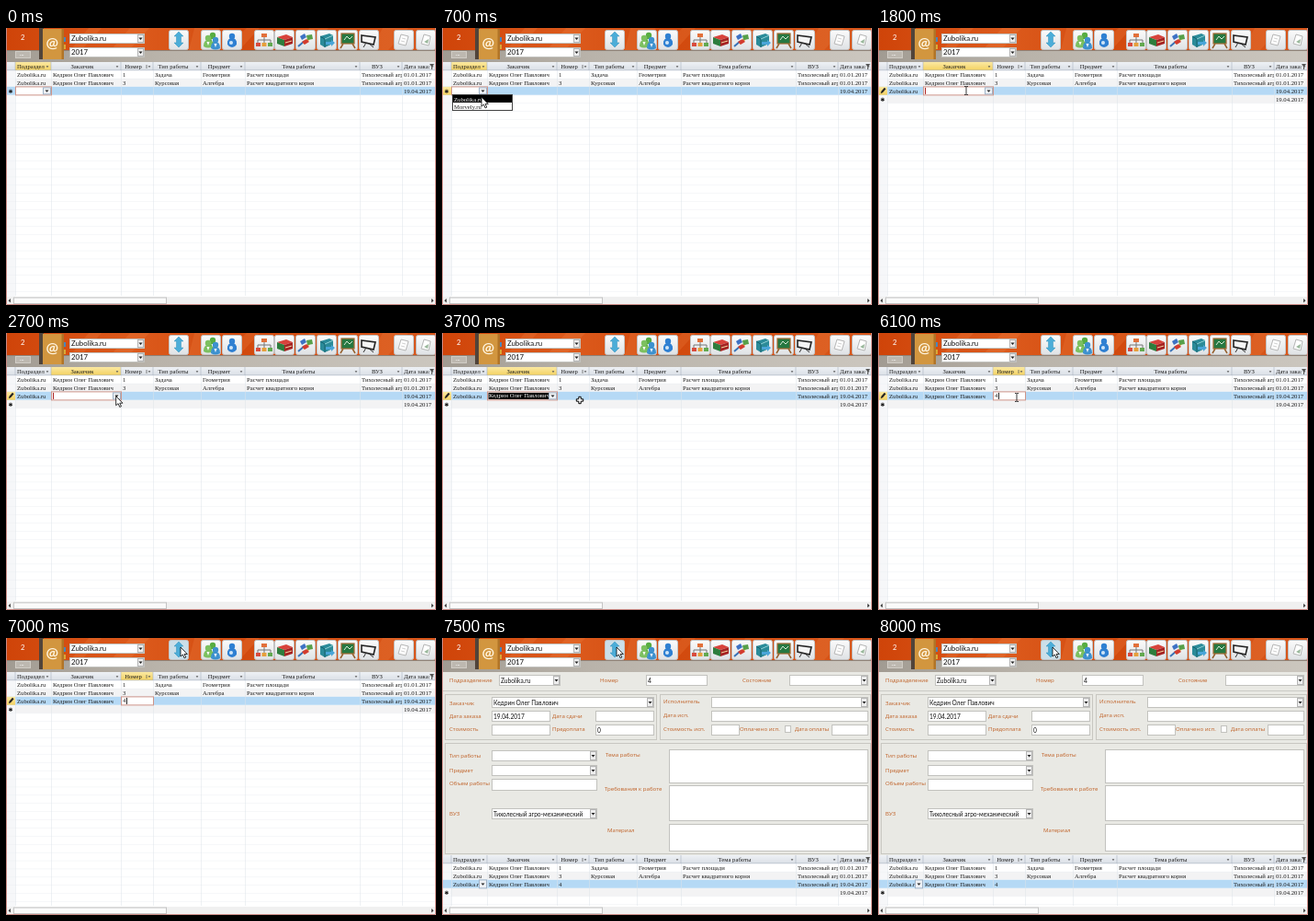
An HTML page that plays this animation: 468x301 px, repeating every 9300 ms.

```html
<!DOCTYPE html>
<html lang="ru">
<head>
<meta charset="utf-8">
<style>
  html, body { margin: 0; width: 100%; height: 100%; overflow: hidden; background: #fff; }
  svg { display: block; }
  text { white-space: pre; }
  .serif { font: 6.7px "Liberation Serif", serif; fill: #1c1c1c; }
  .sans { font: 6.6px Lato, "Open Sans", sans-serif; fill: #111; }
  .bar { font: 7.8px Lato, "Open Sans", sans-serif; fill: #111; }
  .label { font: 6.1px "Open Sans", sans-serif; fill: #bf5f24; }
</style>
</head>
<body>
<svg id="stage" width="468" height="301" viewBox="0 0 468 301">
  <defs>
    <linearGradient id="orange">
      <stop offset="0" stop-color="#cf4409"/><stop offset=".3" stop-color="#dc5a1c"/>
      <stop offset=".55" stop-color="#d24a0e"/><stop offset="1" stop-color="#d8571b"/>
    </linearGradient>
    <linearGradient id="band">
      <stop offset="0" stop-color="#a19b92"/><stop offset=".35" stop-color="#b9b3aa"/>
      <stop offset="1" stop-color="#cbc6be"/>
    </linearGradient>
    <linearGradient id="key" x2="0" y2="1">
      <stop offset="0" stop-color="#fbfbfb"/><stop offset="1" stop-color="#dfe2e5"/>
    </linearGradient>
    <linearGradient id="head" x2="0" y2="1">
      <stop offset="0" stop-color="#eef1f5"/><stop offset="1" stop-color="#dadfe6"/>
    </linearGradient>
    <linearGradient id="lit" x2="0" y2="1">
      <stop offset="0" stop-color="#fbe9a2"/><stop offset="1" stop-color="#f3d160"/>
    </linearGradient>
  </defs>
  <g id="scene"></g>
  <g id="pointer"></g>
</svg>
<script>
const LOOP = 9300;
const SITE = 'Zubolika.ru', SITE2 = 'Morvely.ru';
const CLIENT = 'Кедрин Олег Павлович', SCHOOL = 'Тихолесный агро-механический';
const scene = document.getElementById('scene');
const pointer = document.getElementById('pointer');

const rect = (x, y, w, h, fill, stroke = 'none', more = '') =>
  `<rect x="${x}" y="${y}" width="${w}" height="${h}" fill="${fill}" stroke="${stroke}" ${more}/>`;
const path = (d, fill, stroke = 'none', more = '') =>
  `<path d="${d}" fill="${fill}" stroke="${stroke}" ${more}/>`;
const circle = (x, y, r, fill) => `<circle cx="${x}" cy="${y}" r="${r}" fill="${fill}"/>`;
const text = (x, y, s, kind = 'serif', more = '') =>
  `<text x="${x}" y="${y}" class="${kind}" ${more}>${s}</text>`;
const frame = (x, y, w, h, fill, stroke) => rect(x + .5, y + .5, w - 1, h - 1, fill, stroke);
const triangle = (x, y, r = 2, fill = '#222') =>
  path(`M${x - r} ${y - r / 2}h${2 * r}l${-r} ${r * 1.2}z`, fill);
const clip = (x, y, w, h, body) => `<svg x="${x}" y="${y}" width="${w}" height="${h}">${body}</svg>`;

function field(x, y, w, h, value = '', combo = false, kind = 'sans') {
  return frame(x, y, w, h, '#fff', '#c2c2be') +
    clip(x, y, w - (combo ? 8 : 1), h, text(2, h / 2 + 2.5, value, kind)) +
    (combo ? frame(x + w - 8, y + 1, 7, h - 2, '#eee', '#b4b4b4') + triangle(x + w - 4.5, y + h / 2) : '');
}

const person = (x, y, color) => circle(x, y, 3.2, color) +
  path(`M${x - 5} ${y + 9}q0 -7 5 -7t5 7q-5 3 -10 0z`, color) + path(`M${x - 1.5} ${y + 4}h3l-1.5 4z`, '#fff');

// Each icon sits in a 22 by 22 button.
const icons = [
  [177, path('M11 2l5 5h-2.5v7h2.5l-5 5l-5 -5h2.5v-7h-2.5z', '#4badd8', '#3390bb', 'stroke-width=".5"')],
  [212, person(13, 6, '#57ad42') + person(8, 9, '#7cc060') + person(16, 11, '#3d91cf')],
  [235, person(11, 7, '#2f80d2') + circle(11, 14, 5, '#2f80d2') + circle(10, 14, 2, '#cfe6f8')],
  [270, path('M11 7v4M4 15v-4h14v4M11 11v4', 'none', '#777') + rect(8, 4, 6, 4, '#e2703a') +
    rect(2, 14, 5, 4, '#d94b3d') + rect(8.5, 14, 5, 4, '#e6a03c') + rect(15, 14, 5, 4, '#62a950')],
  [292, path('M3 8l10 -3l7 3l-9 3z', '#d8433b') + path('M3 8l8 3v7l-8 -3z', '#2e7d3d') +
    path('M11 11l9 -3v7l-9 3z', '#a52323') + path('M12 14l7 -2', 'none', '#f3d7a0')],
  [315, path('M3 18l7 -6', 'none', '#3973b8', 'stroke-width="2"') + path('M9 15l8 -7', 'none', '#e3a82e', 'stroke-width="2"') +
    path('M7 13l5 -3l3 3l-5 3z', '#d33b2f') + path('M5 7l5 -3l2 4l-5 3z', '#3e72c4') +
    path('M12 6l6 -1l1 5l-6 1z', '#57a04a')],
  [338, path('M4 7l10 -3l4 2v9l-9 4l-5 -3z', '#2b8b99') + path('M4 7l5 3v9', 'none', '#16616e') +
    path('M9 10l9 -4', 'none', '#8ed0d4') + path('M10 13h6v-2l4 3l-4 4v-2h-6z', '#4aa5d8')],
  [361, path('M6 15l-3 5M16 15l3 5', 'none', '#95602d', 'stroke-width="1.5"') +
    rect(4, 4, 14, 11, '#267841', '#a36a32', 'stroke-width="1.2"') + path('M7 11l3 -4l3 3l3 -3', 'none', '#d5ead8')],
  [384, path('M3 6l15 2l-2 8l-13 -3z', '#f4f4f4', '#222', 'stroke-width="1.6"') +
    path('M8 14l-3 5M11 15l5 4', 'none', '#333')],
  [422, path('M8 5l8 2l-3 10l-8 -2z', '#fff', '#b5b5b5') + path('M9 9l4 1M8 12l4 1', 'none', '#bbb', 'stroke-width=".7"')],
  [446, path('M9 5l7 2l-2 10l-8 -2z', '#fff', '#b5b5b5') + path('M9 13l5 -3l-1 5z', '#9ab89c')]
];

function toolbar(hover) {
  const streaks = [90, 135, 205, 262, 330, 410].map((x, i) =>
    path(`M${x} 0h${14 + i % 3 * 7}l-22 24h-${12 + i % 2 * 8}z`, '#f08a4c', 'none', 'opacity=".22"')).join('');
  const keys = icons.map(([x, art], i) =>
    `<g transform="translate(${x} 2)">` +
    rect(.5, .5, 21, 21, hover && !i ? '#cbdfe9' : 'url(#key)', '#c3c4c5', 'rx="2"') + art + '</g>').join('');
  return rect(0, 0, 468, 24, 'url(#orange)') + streaks + rect(0, 24, 468, 13, 'url(#band)') +
    rect(0, 24, 468, 1, '#8f8277') + text(16, 13, '2', 'bar', 'style="fill:#fff"') +
    frame(10, 25, 17, 8, '#bdb8b0', '#d0ccc5') + text(15, 30, '...', 'sans', 'style="fill:#fff"') +
    rect(36, 0, 5, 34, '#51443a') + rect(40, 1, 23, 33, '#d2963f') +
    rect(60.5, 1, 2.5, 33, '#b17427') + rect(63, 10, 2, 5, '#4b86b9') + rect(63, 18, 2, 5, '#d9a837') +
    text(43.5, 21, '@', 'bar', 'style="font-size:16px;font-weight:bold;fill:#fff4df"') +
    field(69, 6, 82, 11, SITE, true, 'bar') + field(69, 21, 82, 11, '2017', true, 'bar') + keys;
}

const edges = [10, 49, 125, 160, 212, 260, 385, 431, 468];
const titles = ['Подразделение', 'Заказчик', 'Номер', 'Тип работы', 'Предмет', 'Тема работы', 'ВУЗ', 'Дата заказа'];

function cellEditor(col, y, value, mode) {
  const x = edges[col], w = edges[col + 1] - x + 1, combo = col < 2;
  return frame(x, y, w, 10, '#fff', '#cf9488') +
    (mode === 'picked' ? rect(x + 1.5, y + 1.5, 66, 7, '#000') : '') +
    text(x + 2, y + 7, value, 'serif', mode === 'picked' ? 'style="fill:#fff"' : '') +
    (mode === 'caret' ? rect(x + (value ? 6 : 2), y + 1.5, 1, 7, value ? '#222' : '#a22') : '') +
    (combo ? frame(x + w - 10, y + 1, 9, 8, '#eef1f5', '#9fb3c8') + triangle(x + w - 5.5, y + 5) : '');
}

function grid(s) {
  const top = s.form ? 236 : 37, rowY = i => top + 9 + i * 8.9;
  const rows = [
    [SITE, CLIENT, '1', 'Задача', 'Геометрия', 'Расчет площади', SCHOOL, '01.01.2017'],
    [SITE, CLIENT, '3', 'Курсовая', 'Алгебра', 'Расчет квадратного корня', SCHOOL, '01.01.2017'],
    [s.site ? SITE : '', s.client ? CLIENT : '', s.number ? '4' : '', '', '', '', s.client ? SCHOOL : '', '19.04.2017']
  ];
  if (s.site) rows.push(['', '', '', '', '', '', '', '19.04.2017']);
  let out = rect(0, top, 468, 301 - top, '#fff') + rect(0, top, 10, 292 - top, '#f6f7f9');
  rows.forEach((row, r) => {
    if (r % 2) out += rect(10, rowY(r), 458, 8.9, '#f3f3f4');
  });
  for (let y = top + 9; y < 291; y += 8.9) out += rect(0, y, 468, .5, '#eceef2');
  out += rect(0, rowY(2), 468, 8.9, '#b5d9f5') + rect(0, top, 468, 9, 'url(#head)');
  edges.slice(0, 8).forEach((x, i) => {
    const w = edges[i + 1] - x;
    if (s.focus === i) out += rect(x, top, w, 9, 'url(#lit)');
    const first = i === 0 || i === 7;
    out += clip(x, top, w - (first ? 7 : 0), 9, text(first ? 2 : w / 2 - 4, 6.8, titles[i], 'serif',
      first ? '' : 'text-anchor="middle"'));
    out += triangle(x + w - 4, top + 5, 1.4, '#555');
    if (i === 2) out += path(`M${x + w - 7} ${top + 3}v4`, 'none', '#555', 'stroke-width=".7"');
    if (i === 7) out += path(`M461 ${top + 2}h5l-2 3v3h-1v-3z`, '#555');
    out += rect(x - .3, top, .6, 9, '#a9b2bf') + rect(x, top + 9, .5, 282 - top, '#dde2e9');
  });
  out += rect(0, top + 8.6, 468, .5, '#a9b2bf');
  rows.forEach((row, r) => row.forEach((value, c) => {
    if (value) out += clip(edges[c], rowY(r), edges[c + 1] - edges[c], 9, text(2, 6.9, value));
  }));

  const star = r => text(2.6, rowY(r) + 7, '✱', 'serif', 'style="font:6px DejaVu Sans,sans-serif"');
  if (s.started && !s.form) out += rect(0, rowY(2), 10, 8.9, 'url(#lit)');
  if (s.site && !s.form) out += path(`M3 ${rowY(2) + 7.5}l.5 -2.5l3.5 -4l1.6 1.5l-3.5 4z`, '#222');
  out += s.site ? star(3) : star(2);

  const y = rowY(2) - .4;
  if (s.focus === 0) out += cellEditor(0, y, s.site ? SITE : '', '');
  if (s.focus === 1) out += cellEditor(1, y, s.client ? CLIENT : '', s.client ? 'picked' : 'caret');
  if (s.focus === 2) out += cellEditor(2, y, s.number ? '4' : '', 'caret');
  if (s.form) out += frame(40, y, 9, 10, '#eef1f5', '#9fb3c8') + triangle(44.5, y + 5);
  if (s.list) out += frame(11, 72, 66, 18, '#fff', '#444') + rect(12, 73, 64, 8, '#000') +
    text(13, 79.5, SITE, 'serif', 'style="fill:#fff"') + text(13, 87.7, SITE2);

  return out + rect(0, 292, 468, 9, '#f0f0f0') + frame(8, 292.5, 167, 7.5, '#fafafa', '#c4c4c4') +
    path('M5 294l-2.5 2.3l2.5 2.3zM463 294l2.5 2.3l-2.5 2.3z', '#444');
}

const labels = [
  [8, 48, 'Подразделение'], [172, 48, 'Номер'], [327, 48, 'Состояние'],
  [8, 73, 'Заказчик'], [8, 87, 'Дата заказа'], [120, 87, 'Дата сдачи'], [8, 101, 'Стоимость'], [120, 101, 'Предоплата'],
  [241, 71, 'Исполнитель'], [241, 86, 'Дата исп.'], [241, 101, 'Стоимость исп.'], [324, 101, 'Оплачено исп.'], [384, 101, 'Дата оплаты'],
  [8, 130, 'Тип работы'], [8, 146, 'Предмет'], [8, 160, 'Объем работы'], [8, 193, 'ВУЗ'],
  [178, 129, 'Тема работы'], [177, 166, 'Требования к работе'], [180, 211, 'Материал']
];
const fields = [
  [62, 40, 67, 12, SITE, true], [222, 40, 67, 12, '4'], [378, 40, 86, 12, '', true],
  [54, 64, 177, 12, CLIENT, true], [54, 79, 64, 12, '19.04.2017'], [167, 79, 64, 12],
  [54, 94, 64, 12], [167, 94, 64, 12, '0'],
  [293, 64, 171, 12, '', true], [293, 79, 171, 12], [293, 94, 31, 12], [373, 95, 7, 8], [424, 94, 40, 12],
  [54, 122, 115, 12, '', true], [54, 138, 115, 12, '', true], [54, 153, 115, 13], [54, 185, 115, 12, SCHOOL, true],
  [247, 121, 217, 37], [247, 160, 217, 39], [247, 202, 217, 30]
];

function form() {
  return rect(0, 37, 468, 199, '#e9e9e4') + rect(0, 57, 468, 1, '#cbcac5') +
    [[3, 61, 231, 50], [237, 61, 230, 50], [3, 114, 464, 121]].map(b => frame(...b, 'none', '#c8c7c1')).join('') +
    labels.map(l => text(...l, 'label')).join('') + fields.map(f => field(...f)).join('');
}

const shapes = {
  none: '',
  arrow: path('M0 0v10l2.4 -2l1.7 3.8l1.7 -.8l-1.7 -3.5h3.2z', '#fff', '#000', 'stroke-width=".8"'),
  beam: path('M-2 -4.5h1.5l.5 .5l.5 -.5h1.5M0 -4v8M-2 4.5h1.5l.5 -.5l.5 .5h1.5', 'none', '#222', 'stroke-width=".9"'),
  cross: path('M-1.2 -3.7h2.4v2.5h2.5v2.4h-2.5v2.5h-2.4v-2.5h-2.5v-2.4h2.5z', '#fff', '#000', 'stroke-width="1"')
};

// time, x, y, shape shown from that time on
const track = [
  [0, 62, 96, 'none'], [100, 62, 96, 'arrow'], [400, 44, 68, 'arrow'], [650, 43, 75, 'arrow'], [1000, 43, 77, 'arrow'],
  [1100, 48, 75, 'beam'], [1600, 94, 68, 'beam'], [1800, 96, 68, 'beam'], [2200, 119, 68, 'arrow'],
  [3000, 120, 69, 'arrow'], [3300, 122, 70, 'cross'], [3700, 150, 73, 'cross'],
  [4200, 151, 70, 'beam'], [6300, 151, 70, 'cross'], [6600, 174, 36, 'arrow'], [6900, 190, 10, 'arrow'], [LOOP, 190, 10, 'arrow']
];

let lastKey = '', lastShape = '';

function draw(t) {
  const s = {
    started: t >= 100,
    list: t >= 400 && t < 1000,
    site: t >= 1000,
    client: t >= 2900,
    number: t >= 5600,
    hover: t >= 6800,
    form: t >= 7300,
    focus: t < 1600 ? 0 : t < 4300 ? 1 : t < 7300 ? 2 : -1
  };
  const key = JSON.stringify(s);
  if (key !== lastKey) {
    lastKey = key;
    scene.innerHTML = grid(s) + (s.form ? form() : '') + toolbar(s.hover) +
      path('M.5 0v300.5h467v-300.5', 'none', '#c98984');
  }
  const i = track.findIndex(k => k[0] > t), a = track[i - 1], b = track[i];
  const u = (t - a[0]) / (b[0] - a[0]), e = u * u * (3 - 2 * u);
  if (a[3] !== lastShape) pointer.innerHTML = shapes[lastShape = a[3]];
  pointer.setAttribute('transform', `translate(${a[1] + (b[1] - a[1]) * e} ${a[2] + (b[2] - a[2]) * e})`);
}

const start = performance.now();
function tick() {
  const t = (performance.now() - start) % LOOP;
  draw(Math.floor(t / 100) * 100);
  requestAnimationFrame(tick);
}
tick();
</script>
</body>
</html>
```
